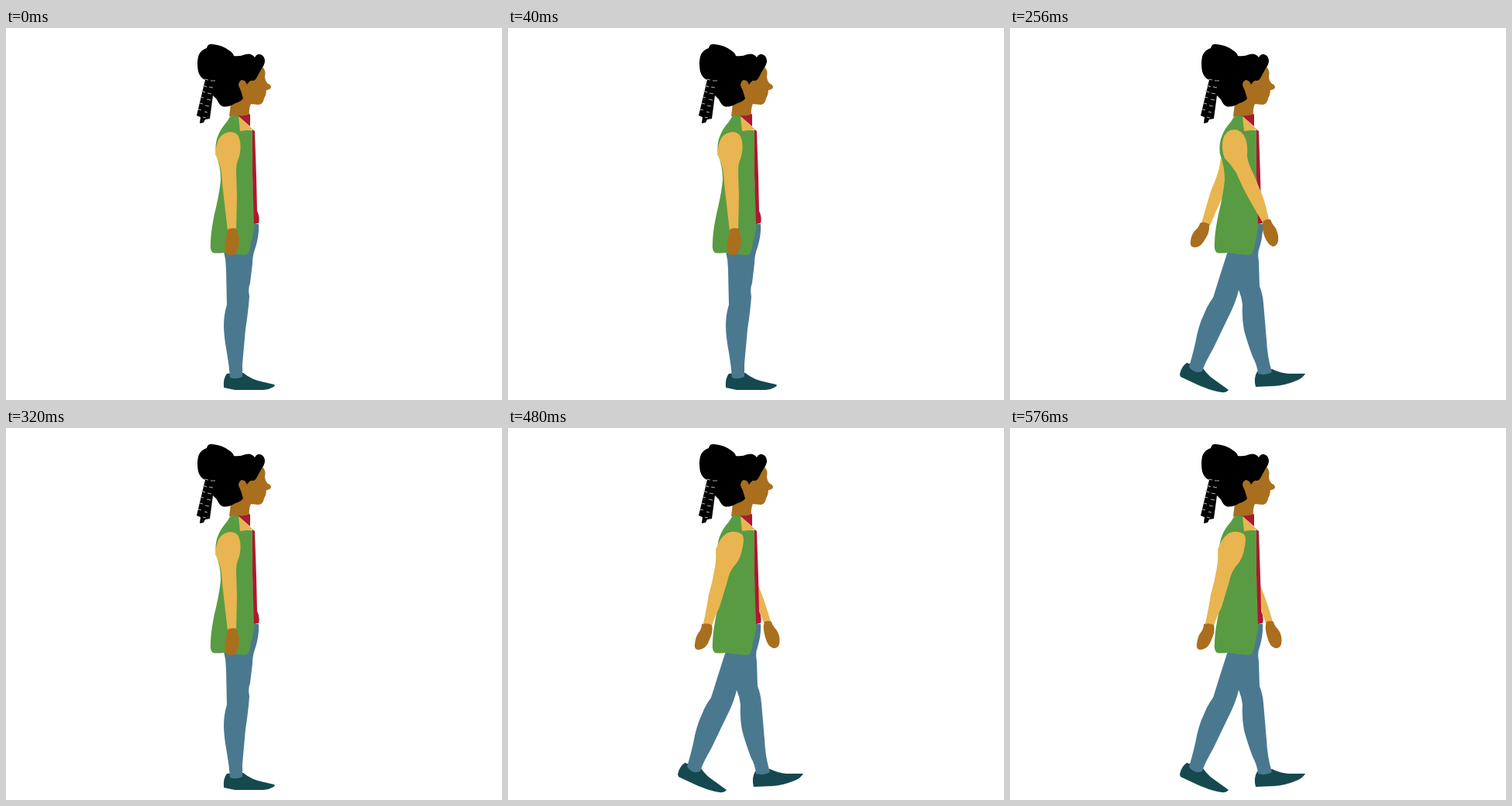
Animation, 640 px wide and 480 px high, one loop 640 ms. Source, as an HTML page:

```html
<!DOCTYPE html>
<html lang="en">
<head>
<meta charset="utf-8">
<title>Walk cycle</title>
<style>
html, body { margin: 0; width: 100%; height: 100%; overflow: hidden; background: #fff; }
svg { display: block; width: 640px; height: 480px; }
.hair { fill: #000; }
.skin { fill: #a96f1f; }
.coat { fill: #599b42; }
.sleeve { fill: #e8b550; }
.shirt { fill: #ae1831; }
.jeans { fill: #4a798f; }
.shoe { fill: #15494f; }
</style>
</head>
<body>
<svg viewBox="0 0 640 480">
  <g data-pose="stand">
    <path class="shoe" d="M285 446L306 445Q317 454 333 457L346 460Q349 462 341 465Q337 467 328 467H295L281 464Q280 452 285 446Z"/>
    <path class="jeans" d="M281 288L320 253H326Q327 266 322 283Q318 293 318 304L315 329Q312 337 314 346Q313 363 309 389L305 434V450Q296 454 289 451Q288 436 285 419Q281 397 281 384Q281 370 285 357L284 312Q284 300 281 288Z"/>
  </g>
  <g data-pose="forward back">
    <path class="shoe" d="M219 447Q221 437 228 432L249 439Q255 448 264 454L282 467Q279 472 267 469Q251 465 237 458L220 450Z"/>
    <path class="shoe" d="M319 443L338 440Q348 445 359 446L381 446Q377 453 367 456Q355 461 341 462L317 463Q314 452 319 443Z"/>
    <path class="jeans" d="M281 288L320 253H326Q327 266 322 283Q319 290 321 301L322 333Q326 343 327 355L331 402Q332 425 338 444Q330 449 320 446Q319 435 313 424Q305 402 302 390Q299 375 300 357Q299 347 295 338Q293 348 287 362L262 414Q251 433 248 443Q238 447 231 437Q235 424 239 407Q243 384 250 370Q255 357 262 348Q271 319 281 288Z"/>
  </g>

  <g data-pose="forward">
    <path class="sleeve" d="M272 168L280 180L276 215Q267 233 258 255L247 252Q254 227 260 208Q270 187 272 168Z"/>
    <path class="skin" d="M245 252Q250 249 257 253Q258 264 252 272Q247 282 240 283Q232 284 233 276Q233 268 239 261Q244 257 245 252Z"/>
  </g>
  <g data-pose="back">
    <path class="sleeve" d="M318 195L323 203Q332 225 339 250L330 252L318 218Z"/>
    <path class="skin" d="M331 250Q336 248 340 250Q341 255 346 260Q352 268 350 279Q348 285 342 284Q335 282 332 270Q328 258 331 250Z"/>
  </g>

  <path class="skin" d="M322 48L331 50Q336 56 334 62Q334 68 338 72Q342 73 342 77Q340 80 336 80Q336 86 333 91Q332 98 326 99L316 98Q313 104 314 114H288L290 98L299 68Z"/>
  <path class="coat" d="M290 113H301L303 131L319 132L318 190L321 252Q319 267 316 278Q314 293 308 293Q295 292 280 290Q272 291 267 290Q263 287 264 278Q264 264 269 240Q276 211 277 195Q277 179 271 163Q269 149 274 138Q277 130 285 121Z"/>
  <path class="shirt" d="M299 113Q307 114 315 111V127ZM318 131L321 133L323 192L324 236Q328 244 326 252L320 253L318 190Z"/>
  <path class="sleeve" d="M300 114L319 131L302 133Z"/>

  <path class="hair" d="M257 67Q250 64 248 56Q246 46 248 37Q250 29 259 26Q260 20 267 21Q279 22 288 29Q293 32 294 36Q302 37 309 34Q317 32 321 38Q324 33 328 34Q334 36 334 43Q333 49 330 52L324 63Q322 68 318 68Q315 67 311 73Q309 67 304 67Q300 69 300 74Q304 82 306 91Q303 95 296 97Q286 103 279 101Q275 99 272 92L267 87L263 117L257 118L255 122L250 123L251 115L246 113Z"/>
  <path fill="none" stroke="#aaa" stroke-width="1.2" d="M256 66l5 1M264 68l6 0M254 74l5 2M262 76l5 1M252 81l5 2M260 84l5 1M251 89l4 1M259 92l5 1M250 97l4 1M257 100l5 1M248 105l4 1M256 108l4 1M254 115l4 1"/>

  <g data-pose="stand">
    <path class="sleeve" d="M270 163Q271 148 276 141Q282 134 291 134Q300 135 302 146Q304 160 299 171Q297 176 297 185L298 218L297 262H286L282 227Q279 202 278 187Q276 173 270 163Z"/>
    <path class="skin" d="M286 260Q291 257 298 259Q298 265 301 271Q301 282 297 290Q293 295 285 292Q281 286 283 274Q286 267 286 260Z"/>
  </g>
  <g data-pose="forward">
    <path class="sleeve" d="M277 168Q272 155 275 143Q279 131 289 131Q299 131 304 143Q307 151 306 166Q308 177 315 190L326 217Q331 231 334 248L326 251Q317 236 308 220Q299 204 292 187Q286 177 277 168Z"/>
    <path class="skin" d="M327 249Q331 246 336 247Q338 253 342 257Q347 265 346 275Q344 282 339 282Q332 279 328 268Q324 257 327 249Z"/>
  </g>
  <g data-pose="back">
    <path class="sleeve" d="M268 157Q273 142 282 136Q292 131 302 137Q306 142 302 157Q300 170 291 179Q285 187 283 198L273 231Q267 243 263 255L252 252Q256 235 259 215Q264 198 267 180Q269 169 268 157Z"/>
    <path class="skin" d="M250 253Q256 251 263 254Q265 263 260 273Q256 285 247 286Q240 287 241 279Q242 269 246 264Q250 259 250 253Z"/>
  </g>
</svg>
<script>
const cycle = ["stand", "forward", "stand", "back"];
const parts = document.querySelectorAll("[data-pose]");

function draw(now) {
  const pose = cycle[Math.floor(now / 160) % cycle.length];
  for (const part of parts) {
    part.style.display = part.dataset.pose.split(" ").includes(pose) ? "" : "none";
  }
  requestAnimationFrame(draw);
}
draw(performance.now());
</script>
</body>
</html>
```
